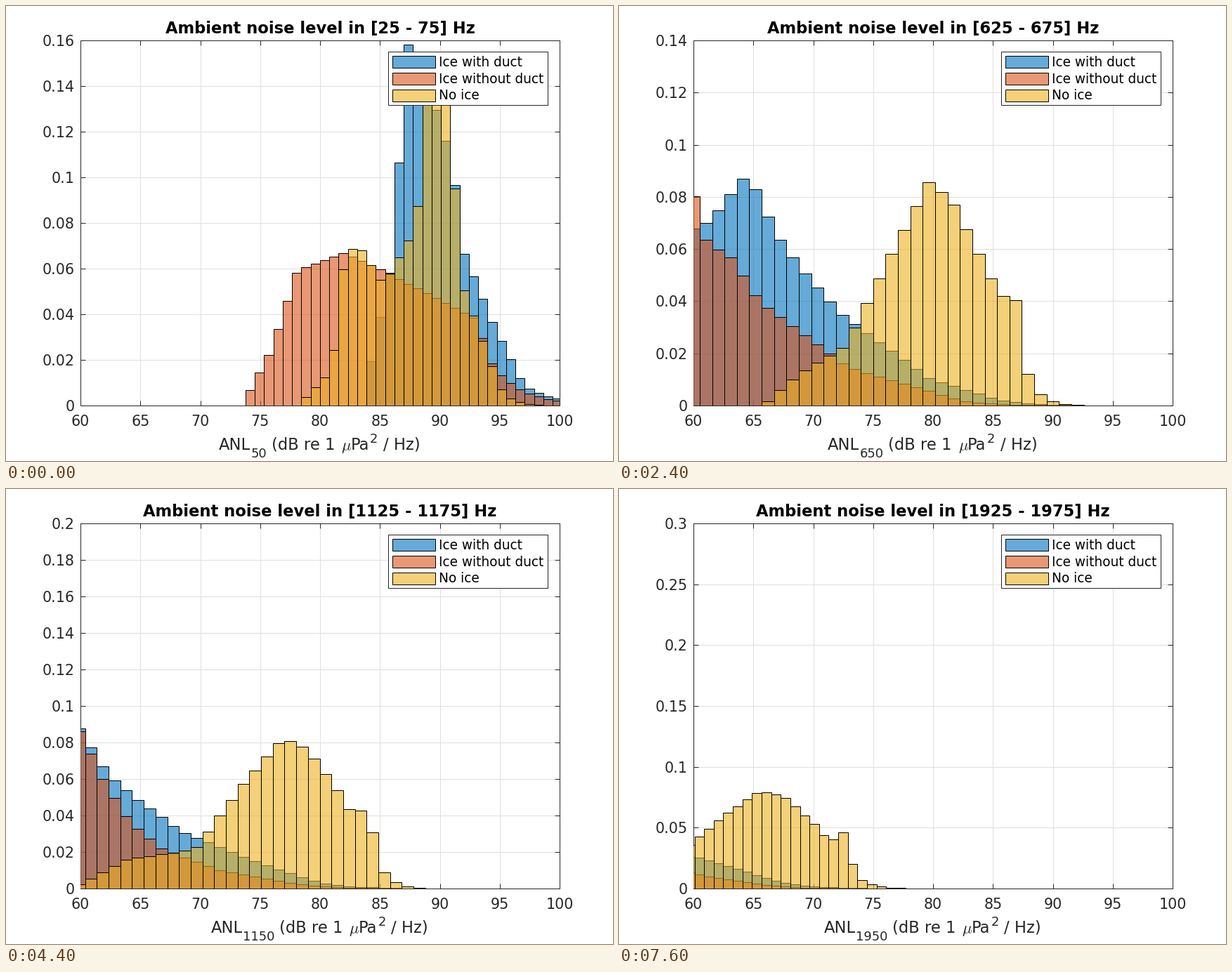
A matplotlib script for the animation above (7800 ms loop, 864x648 px).

```python
import numpy as np
import matplotlib.pyplot as plt
from matplotlib.animation import FuncAnimation
from matplotlib.patches import Rectangle

W, H = 864, 648
PT = 0.72  # points per pixel at 100 dpi
INK = "#262626"
LIMITS = [0.1, 0.12, 0.14, 0.16, 0.18, 0.2, 0.25, 0.3]

# Band centre (Hz): level that anchors the shapes, first bin edge, bin width, highest bar
TRACK = {
    50: (92, 59.79, 0.777, 0.159),
    450: (88, 59.67, 1.031, 0.11),
    800: (85.8, 59.35, 1.037, 0.13),
    1000: (84.9, 59.19, 1.012, 0.17),
    1350: (82.6, 59.71, 0.935, 0.22),
    1600: (80.5, 59.95, 0.873, 0.27),
    1950: (72.5, 59.29, 0.8, 0.28),
}

# Corner points of each density: dB from the anchor, height in thousandths
DUCT = {
    50: [(-8.4, 3), (-6.1, 60), (-4.6, 160), (-3, 142), (-1, 107), (0, 67), (2.5, 35), (5, 9)],
    450: [(-28.5, 2), (-23.6, 48), (-20.6, 88), (-18.5, 68), (-16.5, 52), (-13.4, 36),
          (-6.2, 10), (-2, 4.6)],
    1000: [(-36, 160), (-28.5, 110), (-25, 92), (-22.4, 63), (-20.2, 54), (-16.1, 33),
           (-8.5, 11), (-4.5, 4.3)],
    1475: [(-36, 220), (-28.5, 150), (-22.4, 84), (-20, 61), (-17.8, 42), (-14.5, 28),
           (-11.8, 25), (-5.5, 6)],
}
NO_DUCT = {
    50: [(-18.5, 0), (-16.1, 24), (-13.9, 59), (-10, 67), (-7.5, 61), (-3, 49), (1, 38),
         (2.4, 18)],
    450: [(-33, 110), (-27.8, 90), (-26.4, 50), (-23.9, 53), (-21.6, 40), (-18.6, 34),
          (-14.4, 17), (-6.5, 5.5)],
    1000: [(-36, 130), (-27, 98), (-24.3, 84), (-23, 63), (-20.3, 38), (-17.5, 22),
           (-12.9, 10.5), (-6.5, 3.4)],
    1475: [(-36, 200), (-27, 130), (-22.4, 84), (-20.3, 56), (-18.7, 33), (-16.2, 20),
           (-11, 9.3), (-6.5, 3)],
}
OPEN = {
    50: [(-13.8, 0), (-11, 16), (-10.2, 58), (-9, 72), (-6.7, 53), (-4, 78), (-3, 140),
         (-1.5, 140), (0, 51), (3, 8)],
    450: [(-19.5, 0), (-17, 11), (-14, 23), (-10, 60), (-7, 88), (-5, 77), (-2.5, 54),
          (-1.1, 42), (0, 45), (1, 15)],
    1475: [(-27, 0), (-21.5, 18), (-14.5, 21), (-10.2, 58), (-7, 80), (-5, 76),
           (-2.5, 54), (-1.1, 38), (0, 46), (1, 13)],
}

# Name, fill, corner points, decay length of the upper tail in dB
SERIES = [
    ("Ice with duct", (0, 0.447, 0.741, 0.6), DUCT, 2.5),
    ("Ice without duct", (0.85, 0.325, 0.098, 0.6), NO_DUCT, 2.5),
    ("No ice", (0.929, 0.694, 0.125, 0.6), OPEN, 1),
]


def blend(table, freq):
    """Values between the two neighbouring keys; the last key is held."""
    fs = list(table)
    i = min(np.searchsorted(fs, freq, side="right") - 1, len(fs) - 2)
    a, b = np.array(table[fs[i]]), np.array(table[fs[i + 1]])
    t = min((freq - fs[i]) / (fs[i + 1] - fs[i]), 1)
    return a + t * (b - a)


def density(shape, tail, freq, s):
    x, y = blend(shape, freq).T
    fade = np.exp(-np.maximum(s - x[-1], 0) / tail)
    return np.interp(s, x, y, left=0) * fade / 1000


fig = plt.figure(figsize=(W / 100, H / 100), dpi=100, facecolor="white")
ax = fig.add_axes([106 / W, 79 / H, 682 / W, 520 / H])
ax.set_xlim(60, 100)
ax.set_xticks(range(60, 101, 5))
ax.set_axisbelow(True)
ax.grid(color="#dfdfdf", lw=PT)
ax.tick_params(direction="in", top=True, right=True, length=7 * PT, width=PT,
               color=INK, labelcolor=INK, labelsize=20.7 * PT)
ax.tick_params(axis="x", pad=12.5 * PT)
ax.tick_params(axis="y", pad=8.5 * PT)
ax.yaxis.set_major_formatter(lambda v, _: f"{v:g}")
for spine in ax.spines.values():
    spine.set(color=INK, linewidth=PT, zorder=0.6)

stage = fig.add_axes([0, 0, 1, 1], zorder=2)
stage.set(xlim=(0, W), ylim=(H, 0))
stage.axis("off")


def put(x, y, s, px, color=INK, **kw):
    return stage.text(x, y, s, fontsize=px * PT, color=color, va="baseline", **kw)


def box(x0, y0, x1, y1, face, edge):
    stage.add_patch(Rectangle((x0, y0), x1 - x0, y1 - y0, fc=face, ec=edge, lw=PT))


box(544, 65, 771, 141, "white", INK)
for i, (name, color, *_) in enumerate(SERIES):
    y = 79.5 + 23.8 * i
    box(550, y - 8.5, 611, y + 8.5, color, "black")
    put(615.5, y + 6.3, name, 18.55, "black")

title = put(447, 39.5, "", 22.6, "black", weight="bold", ha="center")
anl = put(303, 632, "ANL", 22.6)
sub = put(348.3, 643, "", 17.9)
unit = [put(377.5, 632, "(dB re 1", 22.6),
        put(477, 632, r"$\mu$", 22.6, math_fontfamily="cm"),
        put(490.5, 632, "Pa", 22.6),
        put(518, 621.5, "2", 17.9),
        put(537, 632, "/ Hz)", 22.6)]
unit_x = [t.get_position()[0] for t in unit]
bars = []


def draw(i):
    freq = 50 * (i + 1)
    anchor, start, width, peak = blend(TRACK, freq)
    left = np.arange(start, 100, width)

    while bars:
        bars.pop().remove()
    for _, color, shape, tail in SERIES:
        h = density(shape, tail, freq, left + width / 2 - anchor)
        bars.append(ax.bar(left, h, width, align="edge", color=color,
                           edgecolor="black", lw=PT))

    top = next(v for v in LIMITS if v >= peak)
    step = 0.02 if top <= 0.2 else 0.05
    ax.set_yticks(np.arange(0, top + step / 2, step))
    ax.set_ylim(0, top)

    title.set_text(f"Ambient noise level in [{freq - 25} - {freq + 25}] Hz")
    sub.set_text(str(freq))
    shift = 5.7 * (len(str(freq)) - 2)
    anl.set_x(303 - shift)
    sub.set_x(348.3 - shift)
    for part, x in zip(unit, unit_x):
        part.set_x(x + shift)
    return []


anim = FuncAnimation(fig, draw, frames=39, interval=200, repeat=True, repeat_delay=0)
plt.show()
```
